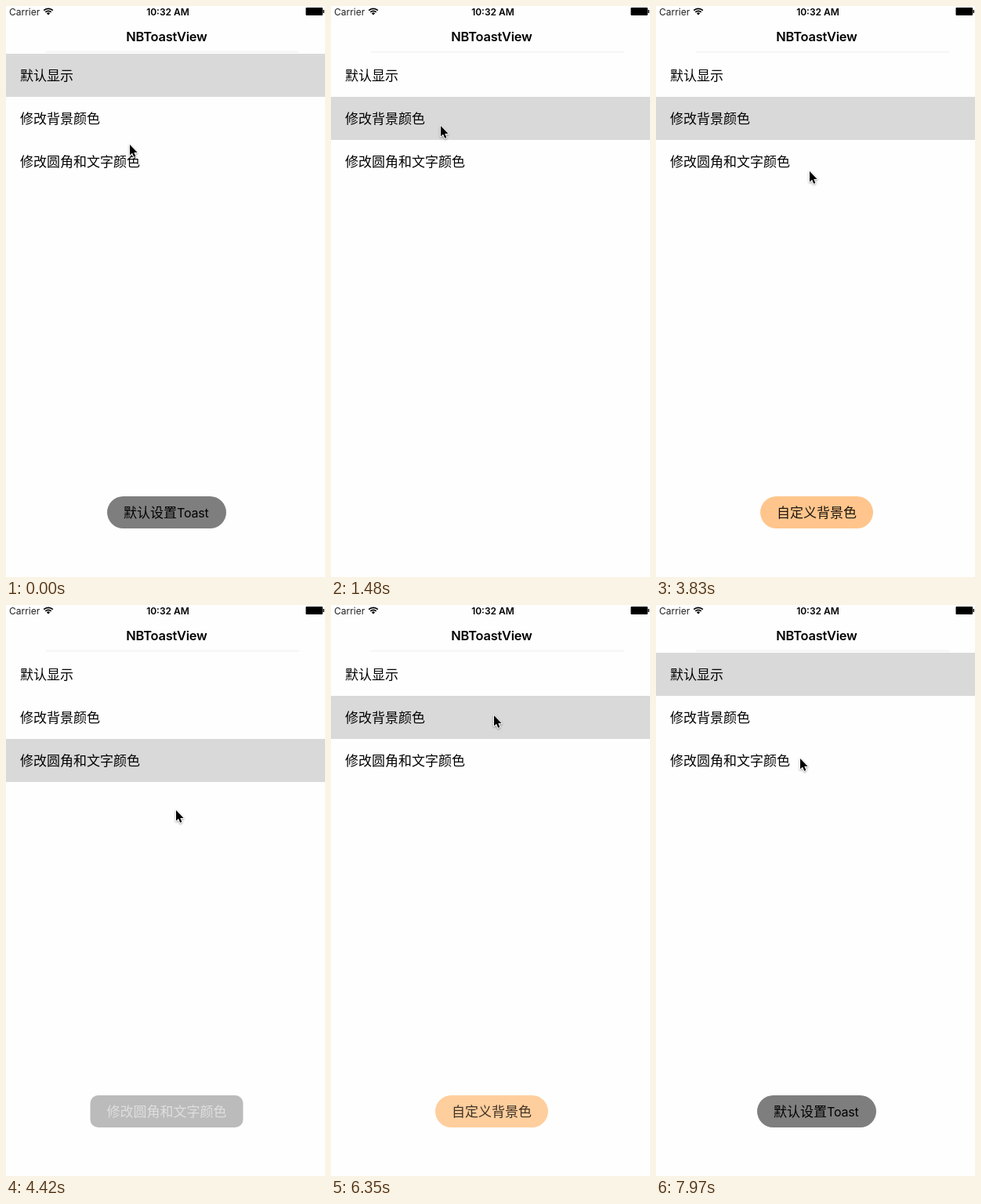
An HTML page with a canvas for the animation above (8000 ms loop, 407 by 729 pixels).

```html
<!DOCTYPE html>
<html lang="zh">
<head>
<meta charset="utf-8">
<title>Toast demo</title>
<style>
html, body { margin: 0; width: 100%; height: 100%; overflow: hidden; background: #fefefe; }
canvas { display: block; width: 407px; height: 729px; }
</style>
</head>
<body>
<canvas id="stage"></canvas>
<script>
const W = 407, H = 729, LOOP = 8000, STEP = 147.6, FADE = 800;
const CJK = '"Noto Sans CJK SC", "Noto Sans CJK", sans-serif';
const LATIN = 'Inter, sans-serif';
const canvas = document.getElementById('stage');
const ctx = canvas.getContext('2d');
const dpr = window.devicePixelRatio || 1;
canvas.width = W * dpr;
canvas.height = H * dpr;

const ROWS = ['默认显示', '修改背景颜色', '修改圆角和文字颜色'];
const TOASTS = [
  { text: '默认设置', tail: 'Toast', textX: 150, x: 129, w: 152, r: 20.5, fill: 'rgba(0,0,0,.5)', ink: '#000' },
  { text: '自定义背景色', textX: 154, x: 133, w: 144, r: 20.5, fill: 'rgba(255,127,0,.5)', ink: '#000' },
  { text: '修改圆角和文字颜色', textX: 128.5, x: 107.5, w: 195, r: 10, fill: 'rgba(0,0,0,.5)', ink: '#fff' }
];

// Each tap selects a row, drops the old toast and fades in the new one.
const TAPS = [
  { step: 0, row: 0, show: -2000, hide: 300 },
  { step: 10, row: 1, show: 1500, hide: 3680 },
  { step: 27, row: 2, show: 4010, hide: 6190 },
  { step: 39, row: 1, show: 5800, hide: 7980 },
  { step: 47, row: 0, show: 6960, hide: 9140 }
];

// Pointer path: step, x, y
const PATH = [
  [0, 157, 176], [1, 149, 184], [6, 149, 184], [10, 139, 152],
  [13, 139, 152], [18, 107, 396], [22, 195, 210], [28, 195, 210],
  [33, 255, 355], [36, 206, 133], [37, 206, 133], [38, 207, 140],
  [43, 207, 140], [47, 177, 95], [49, 177, 95], [54, 183, 195]
];

function smooth(u) {
  u = Math.min(1, Math.max(0, u));
  return u * u * (3 - 2 * u);
}

function pointerAt(step) {
  const i = PATH.findIndex(p => p[0] >= step);
  if (i < 1) return PATH[i < 0 ? PATH.length - 1 : 0].slice(1);
  const [s0, x0, y0] = PATH[i - 1], [s1, x1, y1] = PATH[i];
  const u = smooth((step - s0) / (s1 - s0));
  return [Math.round(x0 + (x1 - x0) * u), Math.round(y0 + (y1 - y0) * u)];
}

function write(text, x, y, font, color, align = 'left', spacing = 0) {
  ctx.font = font;
  ctx.fillStyle = color;
  ctx.textAlign = align;
  ctx.letterSpacing = spacing + 'px';
  ctx.fillText(text, x, y);
}

function drawBars() {
  ctx.fillStyle = '#f6f6f6';
  ctx.fillRect(51, 57.5, 323, 2.5);
  write('Carrier', 4, 11.5, '400 12px ' + LATIN, '#222');
  write('10:32 AM', 206.5, 11.5, '600 12px ' + LATIN, '#000', 'center');
  write('NBToastView', 205, 45, '600 16.4px ' + LATIN, '#000', 'center', -0.2);

  const fan = r => ctx.arc(54, 11.5, r, -Math.PI * 0.75, -Math.PI * 0.25);
  ctx.fillStyle = ctx.strokeStyle = '#000';
  ctx.beginPath();
  ctx.moveTo(54, 11.5);
  fan(3);
  ctx.fill();
  ctx.lineWidth = 1.7;
  for (const r of [5.2, 8.2]) {
    ctx.beginPath();
    fan(r);
    ctx.stroke();
  }

  ctx.beginPath();
  ctx.roundRect(382.5, 2, 21.5, 10, 1);
  ctx.rect(404.5, 5, 1.5, 4);
  ctx.fill();
}

function drawRows(selected) {
  ctx.fillStyle = '#d9d9d9';
  ctx.fillRect(0, 61 + selected * 55, W, 55);
  ROWS.forEach((text, i) => write(text, 18, 95 + i * 55, '17px ' + CJK, '#000'));
}

function drawToast(toast, alpha) {
  if (alpha < 0.05) return;
  ctx.save();
  ctx.globalAlpha = alpha;
  ctx.fillStyle = toast.fill;
  ctx.beginPath();
  ctx.roundRect(toast.x, 626, toast.w, 41, toast.r);
  ctx.fill();
  write(toast.text, toast.textX, 653, '17px ' + CJK, toast.ink);
  if (toast.tail) write(toast.tail, toast.textX + 68, 653, '16px ' + LATIN, toast.ink, 'left', -0.2);
  ctx.restore();
}

function drawPointer(x, y) {
  ctx.save();
  ctx.translate(x + 1, y + 1);
  ctx.beginPath();
  [[0, 0], [0, 13.6], [3.1, 10.8], [5.2, 15.8], [7.4, 14.9], [5.3, 10], [9.6, 10]]
    .forEach(p => ctx.lineTo(...p));
  ctx.closePath();
  ctx.lineJoin = 'round';
  ctx.lineWidth = 1.8;
  ctx.strokeStyle = '#fff';
  ctx.shadowColor = 'rgba(0,0,0,.4)';
  ctx.shadowBlur = 2.5 * dpr;
  ctx.shadowOffsetY = dpr;
  ctx.stroke();
  ctx.shadowColor = 'transparent';
  ctx.fillStyle = '#000';
  ctx.fill();
  ctx.restore();
}

function draw(now) {
  // The screen refreshes in coarse, even steps.
  const step = Math.min(54, Math.floor((now % LOOP + 8) / STEP));
  const t = step * STEP;
  const tap = TAPS.filter(e => e.step <= step).pop();
  const alpha = smooth((t - tap.show) / FADE) * (1 - smooth((t - tap.hide) / FADE));

  ctx.setTransform(dpr, 0, 0, dpr, 0, 0);
  ctx.fillStyle = '#fefefe';
  ctx.fillRect(0, 0, W, H);
  drawBars();
  drawRows(tap.row);
  drawToast(TOASTS[tap.row], alpha);
  drawPointer(...pointerAt(step));
}

function tick() {
  draw(performance.now());
  requestAnimationFrame(tick);
}
tick();
</script>
</body>
</html>
```
